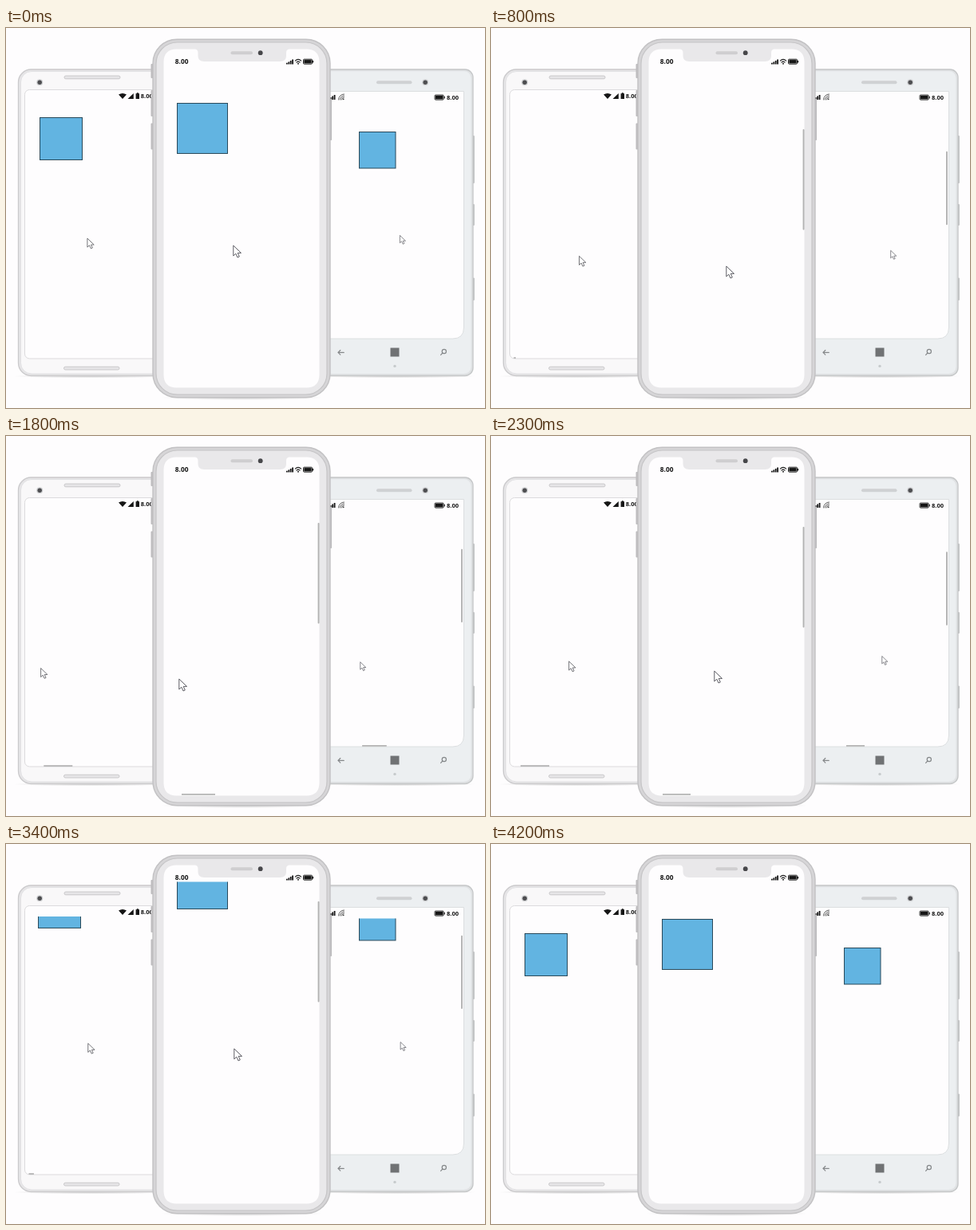
An HTML page that plays this animation: 600 by 477 pixels, repeating every 5000 ms.

```html
<!DOCTYPE html>
<html lang="en">
<head>
<meta charset="utf-8">
<title>Three phones scrolling</title>
<style>
  html, body { margin: 0; width: 100%; height: 100%; overflow: hidden; background: #fefdfe; }
  svg { display: block; width: 600px; height: 477px; }
  text { font-family: "Open Sans", "Noto Sans", sans-serif; font-weight: 700; fill: #161616; }
  .screen { fill: #fefdfe; }
  .square { fill: #62b4e1; stroke: #29495a; stroke-width: 1; }
  .bar { fill: #b2b2b2; }
  .cursor { fill: #fff; stroke: #55555c; stroke-linejoin: round; }
  .line { fill: none; stroke-linecap: round; }
</style>
</head>
<body>
<svg viewBox="0 0 600 477" xmlns="http://www.w3.org/2000/svg">
  <defs>
    <radialGradient id="shade">
      <stop offset="0" stop-color="#aaa" stop-opacity=".6"/>
      <stop offset="1" stop-color="#aaa" stop-opacity="0"/>
    </radialGradient>
    <g id="battery">
      <rect x=".5" y=".5" width="11" height="6" rx="1" fill="#ddd" stroke="#222"/>
      <rect x="1.4" y="1.4" width="9.2" height="4.2" fill="#161616"/>
      <rect x="12" y="2.2" width="1.2" height="2.6" fill="#222"/>
    </g>
    <path id="signal" d="M0 4.2h1.8V6H0zM2.4 3h1.8v3H2.4zM4.8 1.6h1.8V6H4.800zM7.200 0H9v6H7.200z" fill="#161616"/>
    <g id="lens">
      <circle r="4" fill="#cfd0d2"/>
      <circle r="2.7" fill="#4d4d50"/>
    </g>
    <path id="arrow" d="M0 0V13L3 10.2L5.2 15L7.5 14L5.4 9.4H9.7Z"/>
  </defs>

  <!-- left phone -->
  <ellipse cx="108" cy="437" rx="100" ry="2.5" fill="url(#shade)"/>
  <rect x="15.5" y="52" width="186" height="384.5" rx="16" fill="#e6e5e7" stroke="#cbcacc" stroke-width="1.3"/>
  <rect x="18.5" y="54.5" width="180" height="379.5" rx="13.5" fill="#f9f8f9" stroke="#dedde0" stroke-width=".8"/>
  <rect class="screen" x="23.5" y="77.5" width="168" height="337.5" rx="6" stroke="#dcdbdd" stroke-width="1"/>
  <rect x="73" y="60" width="70" height="3.8" rx="1.9" fill="#e6e5e7" stroke="#c6c5c7" stroke-width=".9"/>
  <rect x="72.5" y="425.2" width="69.5" height="3.8" rx="1.9" fill="#e6e5e7" stroke="#c6c5c7" stroke-width=".9"/>
  <use href="#lens" x="42.2" y="68.3"/>
  <path d="M141 83.6Q146 80.4 151 83.6L146 89ZM152.5 89L159.8 82V89Z" fill="#161616"/>
  <path d="M162.6 82.2h1.2v-1h2v1h1.2V89h-4.4z" fill="#161616"/>
  <text x="168.8" y="88.2" font-size="7.5">8.00</text>
  <g id="left"></g>

  <!-- right phone -->
  <ellipse cx="490" cy="437" rx="100" ry="2.5" fill="url(#shade)"/>
  <g fill="#b9babc">
    <rect x="584.5" y="135" width="2.3" height="60" rx="1"/>
    <rect x="584.5" y="221" width="2.3" height="27" rx="1"/>
    <rect x="584.5" y="313.5" width="2.3" height="28.5" rx="1"/>
  </g>
  <rect x="388" y="52" width="197" height="384.5" rx="10" fill="#dfe1e3" stroke="#c5c7c8" stroke-width="1.3"/>
  <rect x="390" y="54.3" width="192.5" height="379.8" rx="8.5" fill="#eceff1"/>
  <path class="screen" d="M394 79.5H573.5V376Q573.5 390 559.5 390H394Z" stroke="#d9dcdd" stroke-width=".9"/>
  <rect x="464" y="66.3" width="44.5" height="4" rx="2" fill="#cfd1d3"/>
  <use href="#lens" x="525.2" y="68.2"/>
  <use href="#signal" x="403.5" y="84"/>
  <g class="line" stroke="#333" stroke-width=".8">
    <path d="M416.5 90A7 7 0 0 1 423.5 83M418.5 90A5 5 0 0 1 423.5 85M420.4 90A3.1 3.1 0 0 1 423.5 86.9"/>
  </g>
  <circle cx="422.7" cy="89.3" r=".9" fill="#333"/>
  <use href="#battery" x="536.6" y="83.6"/>
  <text x="552" y="90" font-size="7.5">8.00</text>
  <g class="line" stroke="#85888a" stroke-width="1.2">
    <path d="M423.3 407.3H416M418.8 404.5L416 407.3L418.8 410.1"/>
    <circle cx="548.8" cy="406" r="2.6"/>
    <path d="M546.8 408L544.6 410.3"/>
  </g>
  <rect x="481.5" y="401.5" width="11" height="11" fill="#707274"/>
  <circle cx="487" cy="424.4" r="1.7" fill="#c6cacc"/>
  <g id="right"></g>

  <!-- middle phone -->
  <ellipse cx="295.5" cy="464" rx="102" ry="3" fill="url(#shade)"/>
  <g fill="#bdbcbe">
    <rect x="181.5" y="45" width="3" height="18" rx="1"/>
    <rect x="181.5" y="78" width="3" height="33" rx="1"/>
    <rect x="181.5" y="119.5" width="3" height="33" rx="1"/>
    <rect x="405.5" y="89" width="2.6" height="52" rx="1"/>
  </g>
  <rect x="184" y="14.3" width="222" height="449.5" rx="30" fill="#d6d5d7" stroke="#c2c1c3" stroke-width="1.4"/>
  <rect x="188" y="18" width="214" height="442.2" rx="26.5" fill="#e9e8ea" stroke="#c6c5c7" stroke-width="1.2"/>
  <path class="screen" d="M214 26.5H236Q240.5 26.5 240.5 31V35Q240.5 42 248 42H343.5Q351 42 351 35V31Q351 26.5 355.5 26.5H376Q392.5 26.5 392.5 43V435Q392.5 451.5 376 451.5H214Q197.5 451.5 197.5 435V43Q197.5 26.5 214 26.5Z"/>
  <rect x="281.5" y="29.3" width="27.5" height="4" rx="2" fill="#cfced0"/>
  <circle cx="318.7" cy="31.2" r="2.9" fill="#47474a"/>
  <text x="211.8" y="45.3" font-size="8.3">8.00</text>
  <use href="#signal" x="351" y="39.5"/>
  <g class="line" stroke="#222" stroke-width="1.1">
    <path d="M362.3 41.2Q366 37.7 369.7 41.2M363.9 43.1Q366 41.2 368.1 43.1"/>
  </g>
  <circle cx="366" cy="44.8" r="1" fill="#222"/>
  <use href="#battery" x="372" y="38.7"/>
  <g id="middle"></g>
</svg>
<script>
const LOOP = 5000, STEP = 100, END = 4200;

// time, pointer x, pointer y, vertical scroll, right end of the horizontal thumb
const KEYS = [
  [0, 284, 273, 0, 201],
  [300, 288, 322, 8, 201],
  [600, 293, 308, 103, 201],
  [800, 294, 299, 338, 201],
  [1000, 285, 305, 398, 201],
  [1200, 221, 318, 412, 201],
  [1500, 219, 307, 390, 214],
  [1800, 216, 305, 252, 262],
  [2100, 216, 305, 252, 262],
  [2300, 279, 295, 276, 250],
  [2700, 302, 240, 298, 211],
  [3000, 299, 245, 295, 208],
  [3300, 287, 256, 110, 206],
  [3400, 285, 257, 76, 205.6],
  [3600, 284, 260, 28, 205.6],
  [3900, 284, 262, 0, 205.6],
  [4200, 284, 262, 0, 205.6]
];

// k: size against the middle phone; vx, vTop: vertical thumb; hy, hEnd, hMin: horizontal thumb
const PHONES = [
  { id: "left", k: 0.857, square: [42.5, 112.5, 53], scroll: 0.79, top: 91, drift: -2,
    pointer: [101.9, 264], hy: 413.2, hEnd: 73, hMin: 28.5 },
  { id: "middle", k: 1, square: [214.5, 94.5, 63], scroll: 1, top: 47.5, drift: 0,
    pointer: [284.8, 273], vx: 390.6, vTop: 56, hy: 449, hEnd: 250, hMin: 215 },
  { id: "right", k: 0.73, square: [442.5, 130.5, 45.5], scroll: 0.724, top: 93.5, drift: 0,
    pointer: [493.4, 260.3], vx: 570, vTop: 103, hy: 388, hEnd: 468, hMin: 445 }
];

function add(parent, tag, attrs) {
  const el = document.createElementNS("http://www.w3.org/2000/svg", tag);
  set(el, attrs);
  return parent.appendChild(el);
}

function set(el, attrs) {
  for (const name in attrs) el.setAttribute(name, attrs[name]);
}

for (const p of PHONES) {
  const group = document.getElementById(p.id);
  const [x, y, size] = p.square;
  const clip = add(group, "clipPath", { id: p.id + "-view" });
  add(clip, "rect", { x: x - 20, y: p.top, width: 140, height: 300 });
  const view = add(group, "g", { "clip-path": `url(#${p.id}-view)` });
  p.box = add(view, "rect", { class: "square", x, y, width: size, height: size });
  p.bars = add(group, "g", {});
  if (p.vx) p.vBar = add(p.bars, "rect", { class: "bar", x: p.vx, width: 1.9, height: 126.5 * p.k, rx: 0.9 });
  p.hBar = add(p.bars, "rect", { class: "bar", y: p.hy, height: 1.7 });
  p.arrow = add(group, "use", { href: "#arrow", class: "cursor", "stroke-width": 0.95 });
}

function poseAt(t) {
  const i = Math.max(1, KEYS.findIndex(key => key[0] >= t));
  const a = KEYS[i - 1], b = KEYS[i];
  const f = (t - a[0]) / (b[0] - a[0]);
  return a.map((v, n) => v + (b[n] - v) * f).slice(1);
}

function draw(t) {
  const active = t < END;
  const [x, y, scroll, end] = active ? poseAt(t) : poseAt(0);
  for (const p of PHONES) {
    const dx = active && t >= 3300 ? p.drift : 0;
    set(p.box, { transform: `translate(${dx} ${-scroll * p.scroll})` });
    set(p.bars, { visibility: active && t > 0 ? "visible" : "hidden" });
    if (p.vBar) set(p.vBar, { y: p.vTop + scroll * 0.21 * p.k });

    const right = p.hEnd + (end - 250) * p.k;
    const left = Math.max(p.hMin, right - 42 * p.k);
    set(p.hBar, { x: left, width: Math.max(0, right - left) });

    const px = p.pointer[0] + (x - 284) * p.k;
    const py = p.pointer[1] + (y - 273) * p.k;
    set(p.arrow, {
      transform: `translate(${px} ${py}) scale(${p.k})`,
      visibility: active ? "visible" : "hidden"
    });
  }
}

const start = performance.now();
function tick() {
  const t = (performance.now() - start) % LOOP;
  draw(Math.floor(t / STEP) * STEP);
  requestAnimationFrame(tick);
}
tick();
</script>
</body>
</html>
```
